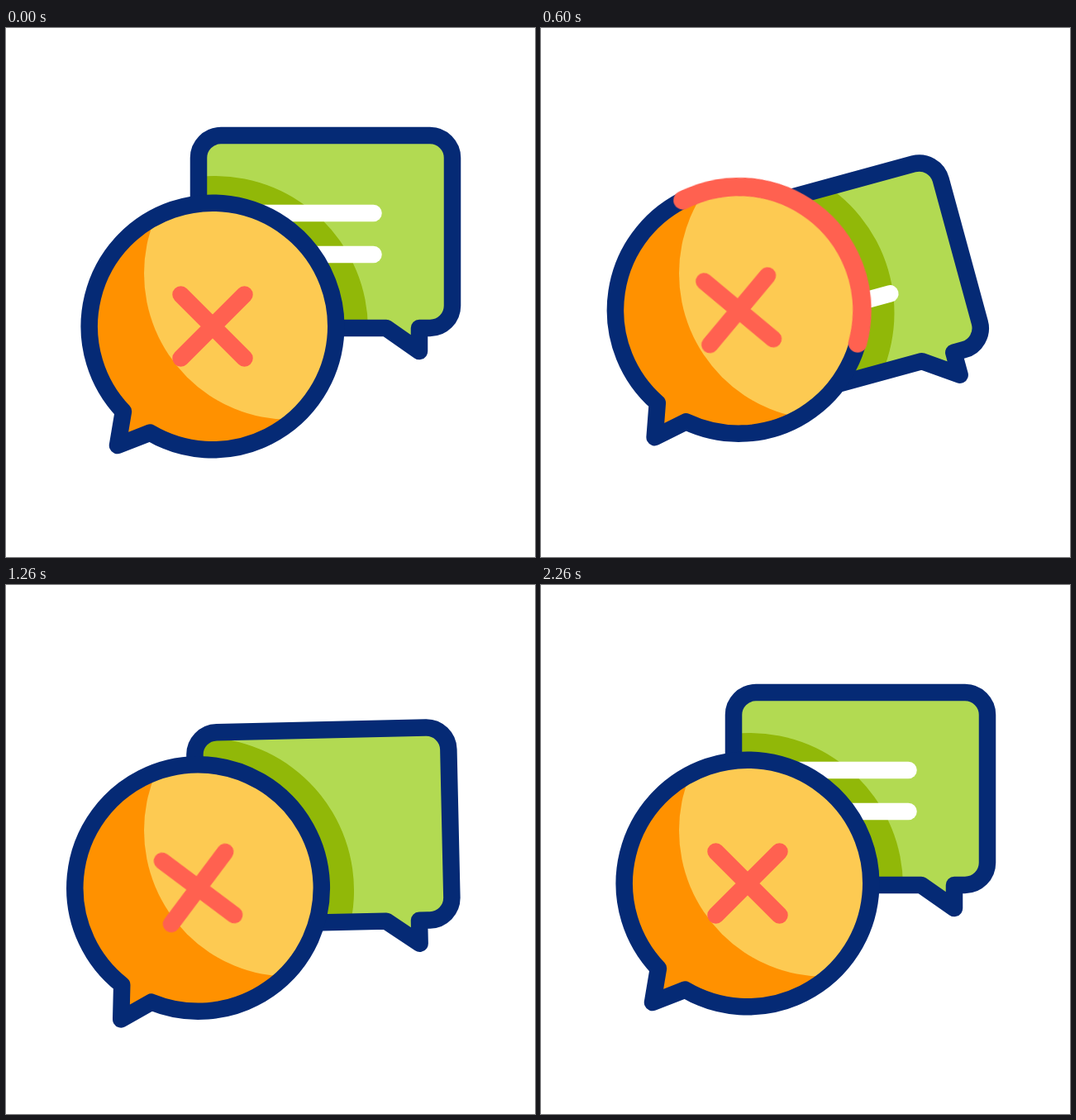
An HTML page without scripts for the animation above (2.4 s loop, 640 by 640 pixels).

```html
<!DOCTYPE html>
<html lang="en">
<head>
<meta charset="utf-8">
<title>Chat bubbles</title>
<style>
  @property --lead { syntax: "<length>"; inherits: false; initial-value: 0px; }
  @property --tail { syntax: "<length>"; inherits: false; initial-value: 0px; }

  html, body { margin: 0; width: 100%; height: 100%; overflow: hidden; background: #fff; }
  svg { display: block; width: 100%; height: 100%; }

  .round, .square, .line, .runner {
    animation-duration: 2400ms;
    animation-iteration-count: infinite;
    animation-timing-function: cubic-bezier(.333, 0, .667, 1);
  }
  .round { transform-origin: 158px 477px; animation-name: round-swing, round-bob; }
  .square { transform-origin: 480px 363px; animation-name: square-swing, square-bob; }

  .outline, .line, .runner, .cross { fill: none; stroke-linecap: round; stroke-linejoin: round; stroke-width: 20.5; }
  .outline { stroke: #052a75; }
  .cross { stroke: #ff6150; }
  .line { stroke: #fff; stroke-dasharray: 1 2; }
  .line.top { animation-name: top-line; }
  .line.bottom { animation-name: bottom-line; }
  .runner {
    stroke: #ff6150;
    stroke-width: 22.5;
    stroke-dasharray: calc(var(--lead) - var(--tail)) 200px;
    stroke-dashoffset: calc(-1 * var(--tail));
    animation-name: lead, tail, runner-shown;
  }

  @keyframes round-swing {
    0% { rotate: 0deg; }
    17.83% { rotate: -18.2deg; }
    35.67% { rotate: 18.2deg; }
    53.5% { rotate: -8.4deg; }
    70% { rotate: 3.2deg; }
    87.5%, 100% { rotate: 0deg; }
  }
  @keyframes round-bob {
    0% { translate: 0 0; }
    14.58% { translate: 0 53px; }
    29.58% { translate: 0 -30px; }
    45% { translate: 0 54px; }
    60% { translate: 0 -18.5px; }
    75% { translate: 0 16.5px; }
    90.8%, 100% { translate: 0 0; }
  }
  @keyframes square-swing {
    0%, 3.96% { rotate: 0deg; }
    23.4% { rotate: -16deg; }
    41.4% { rotate: 16deg; }
    58.5% { rotate: -8deg; }
    77.4% { rotate: 4deg; }
    94.2%, 100% { rotate: 0deg; }
  }
  @keyframes square-bob {
    0%, 5.4% { translate: 0 0; }
    20.4% { translate: 0 53.5px; }
    35.4% { translate: 0 -28px; }
    50.4% { translate: 0 47px; }
    65.4% { translate: 0 -22px; }
    80.4% { translate: 0 14.5px; }
    94.2%, 100% { translate: 0 0; }
  }
  @keyframes top-line {
    0%, 15.83%, 82.5%, 100% { stroke-dashoffset: 0; }
    35.83%, 62.5% { stroke-dashoffset: 1.005; }
  }
  @keyframes bottom-line {
    0%, 25.83%, 72.9%, 100% { stroke-dashoffset: 0; }
    46.04%, 52.9% { stroke-dashoffset: 1.005; }
  }
  @keyframes lead {
    0%, 2.17% { --lead: 0px; }
    38.6%, 100% { --lead: 100px; }
  }
  @keyframes tail {
    0%, 9.33% { --tail: 0px; }
    49.8%, 100% { --tail: 100px; }
  }
  @keyframes runner-shown {
    0%, 49.8%, 100% { opacity: 0; animation-timing-function: step-end; }
    2.2% { opacity: 1; animation-timing-function: step-end; }
  }
</style>
</head>
<body>
<svg viewBox="0 0 640 640">
  <defs>
    <path id="round" d="M141.92 463.93A149.25 149.25 0 1 1 174.25 489.6L135 505Z"/>
    <path id="square" d="M460 363L500 391V363H513a27 27 0 0 0 27-27V157a27 27 0 0 0-27-27H260a27 27 0 0 0-27 27V336a27 27 0 0 0 27 27Z"/>
    <clipPath id="in-round"><use href="#round" class="round"/></clipPath>
    <clipPath id="in-square"><use href="#square" class="square"/></clipPath>
  </defs>

  <use href="#square" class="square" fill="#b2da52"/>
  <g clip-path="url(#in-square)">
    <circle class="round" cx="252.5" cy="364.5" r="185.5" fill="#91b808"/>
  </g>
  <g class="square">
    <path class="line top" pathLength="1" d="M310.5 224H444.5"/>
    <path class="line bottom" pathLength="1" d="M310.5 274H444.5"/>
    <use href="#square" class="outline"/>
  </g>

  <use href="#round" class="round" fill="#ff9100"/>
  <!-- The highlight stays still while the bubble moves over it -->
  <g clip-path="url(#in-round)">
    <circle cx="344" cy="297" r="177" fill="#fdca52"/>
  </g>
  <g class="round">
    <use href="#round" class="outline"/>
    <path class="runner" pathLength="100" d="M139.6 479L135 505L174.25 489.6A149.25 149.25 0 1 0 141.92 463.93L139.6 479"/>
    <path class="cross" d="M211.5 322.5l77 77m0-77l-77 77"/>
  </g>
</svg>
</body>
</html>
```
